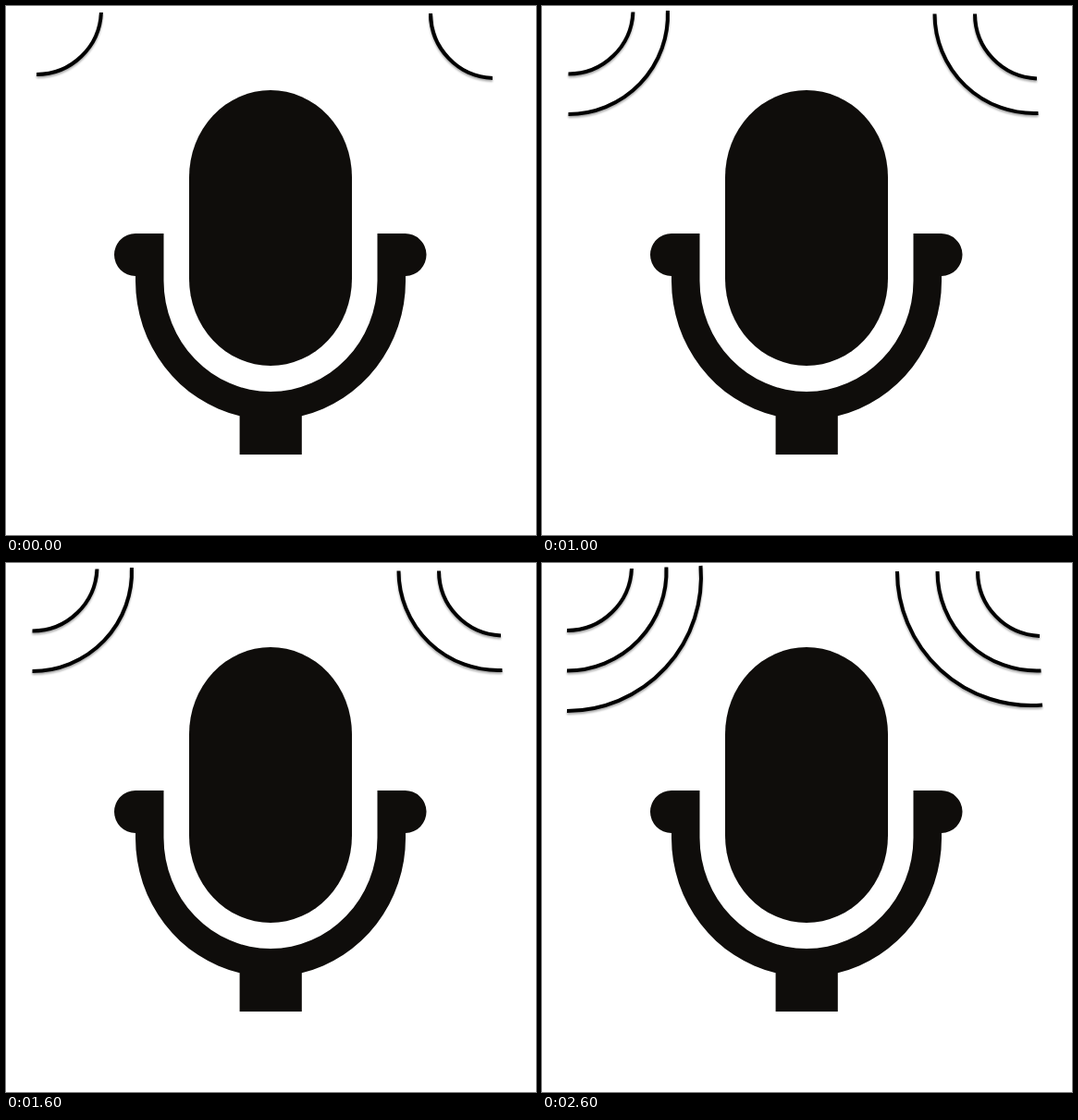
An HTML page for the animation above (3 s loop, 573 px wide and 572 px high).

```html
<!DOCTYPE html>
<html lang="en">
<head>
<meta charset="utf-8">
<title>Microphone</title>
<style>
  html, body { margin: 0; width: 100%; height: 100%; overflow: hidden; background: #fff; }
  svg { display: block; width: 573px; height: 572px; }
  .mic { fill: #0f0d0b; }
  .waves { fill: none; stroke: #000; stroke-width: 4; filter: drop-shadow(0 2px 1px rgba(0, 0, 0, .35)); }
</style>
</head>
<body>
<svg viewBox="0 0 573 572">
  <g class="mic">
    <rect x="198" y="91" width="176" height="298" rx="88" ry="94"/>
    <path d="M170.5 246H140A23 23 0 0 0 140 292V297A146 150 0 0 0 252.6 443.3V485H319.8V443.3A146 150 0 0 0 432 297V292A23 23 0 0 0 431 246H401.5V297A115.5 120 0 0 1 170.5 297Z"/>
  </g>
  <g class="waves"><g id="left"></g><g id="right"></g></g>
</svg>
<script>
  const STEP = 1000;
  const RINGS = 3;
  const NS = 'http://www.w3.org/2000/svg';
  const left = document.getElementById('left');
  const right = document.getElementById('right');

  // About a quarter circle; larger rings reach further past the centre line.
  function quarter(i) {
    const r = 70 + 37.5 * i;
    const over = 7.5 * i - 3;
    return `M${Math.sqrt(r * r - over * over)} ${-over}A${r} ${r} 0 0 1 0 ${r}`;
  }

  function addRing(parent, i, transform) {
    const path = document.createElementNS(NS, 'path');
    path.setAttribute('d', quarter(i));
    path.setAttribute('transform', transform);
    parent.appendChild(path);
  }

  for (let i = 0; i < RINGS; i++) {
    addRing(left, i, `translate(27 ${3 + 6 * i})`);
    addRing(right, i, `translate(${541 - 6 * i} 9) rotate(90)`);
  }

  // Each step adds a ring, and both sets settle outwards.
  function draw(time) {
    const step = Math.floor(time / STEP) % RINGS;
    const rest = RINGS - 1 - step;
    left.setAttribute('transform', `translate(${1.5 * rest ** 2} ${rest / 2})`);
    right.setAttribute('transform', `translate(${-3 * rest ** 2} ${-rest / 2})`);
    for (const side of [left, right]) {
      [...side.children].forEach((ring, i) => {
        ring.style.display = i <= step ? '' : 'none';
      });
    }
  }

  const start = performance.now();
  function tick() {
    draw(performance.now() - start);
    requestAnimationFrame(tick);
  }
  tick();
</script>
</body>
</html>
```
